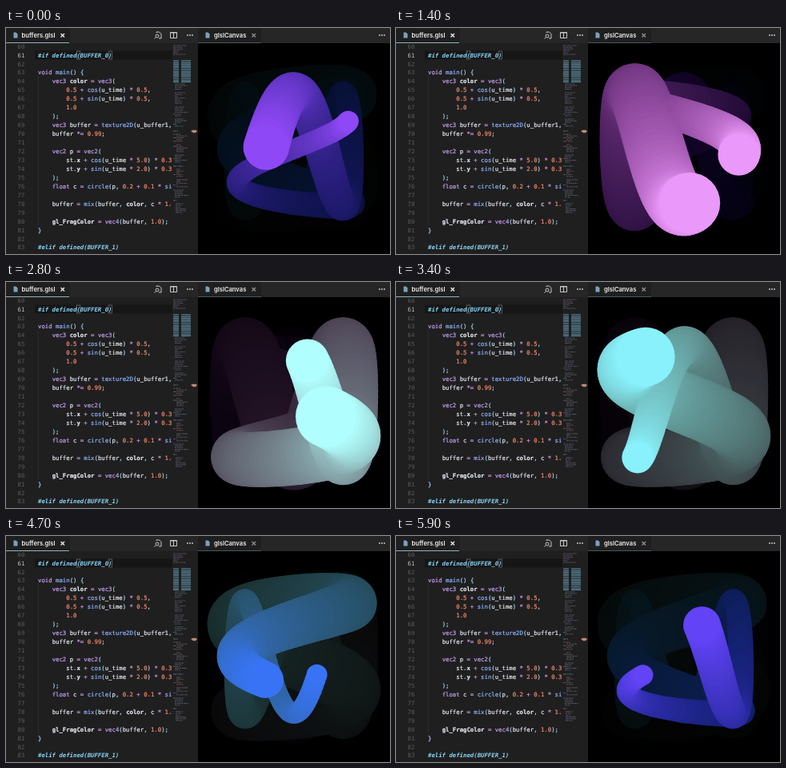
These frames come from a looping animation (480 px wide and 283 px high, 6000 ms). An HTML page with a canvas:

```html
<!DOCTYPE html>
<html lang="en">
<head>
<meta charset="utf-8">
<title>buffers.glsl</title>
<style>
  html, body { margin: 0; width: 100%; height: 100%; overflow: hidden; background: #000; }
  canvas, svg { position: absolute; left: 0; top: 0; width: 480px; height: 283px; display: block; }
  .code { font: 7.32px "DejaVu Sans Mono", monospace; white-space: pre; stroke-width: .2; }
  .bold { font-weight: bold; }
  .directive { font-weight: bold; font-style: italic; }
  .tab { font: 600 7.6px Inter, sans-serif; fill: #f0f0f0; }
  .icon { fill: none; stroke: #c8c8c8; stroke-width: 1; }
  .close { stroke: #f0f0f0; stroke-width: 1.3; }
</style>
</head>
<body>
<canvas id="view"></canvas>
<svg viewBox="0 0 480 283" xmlns="http://www.w3.org/2000/svg">
  <defs>
    <clipPath id="pane"><rect y="19" width="208" height="264"/></clipPath>
    <path id="page" d="M0 0h3l2 2v5h-5z" fill="#7aa3b8"/>
  </defs>
  <rect width="240" height="283" fill="#1f1f20"/>
  <rect x="80" width="160" height="19" fill="#262627"/>
  <rect x="240" width="240" height="19" fill="#262627"/>
  <rect x="240" width="79" height="19" fill="#1f1f20"/>
  <rect y="18" width="79" height="1" fill="#8fb3b8"/>
  <rect x="240" y="18" width="79" height="1" fill="#465a5e"/>
  <use href="#page" x="9.500" y="5.500"/>
  <use href="#page" x="249.500" y="5.500"/>
  <text class="tab" x="19.600" y="11.800">buffers.glsl</text>
  <text class="tab" x="260" y="11.800">glslCanvas</text>
  <path class="icon close" d="M68.500 7l4.500 4.500m0-4.500l-4.500 4.500"/>
  <path class="icon close" opacity=".55" d="M307.500 7l4.500 4.500m0-4.500l-4.500 4.500"/>
  <path class="icon" d="M188 6V5h3.500l2.500 2.500V13h-3M191 10a2 2 0 1 0-4 0a2 2 0 1 0 4 0M187.500 11.500l-2 2"/>
  <path class="icon" d="M205.500 5.500h8v7h-8zM209.500 5.500v7M205 6h9"/>
  <g id="dots" fill="#d0d0d0"></g>
  <g id="code" clip-path="url(#pane)">
    <rect x="36" y="28.500" width="172" height="11" fill="#161617"/>
    <path d="M40.500 59V248" stroke="#333335" stroke-width=".6"/>
  </g>
  <g id="map"></g>
  <path d="M231 129l2.500-1.200h3.500l2 1.200l-2 2.200h-3z" fill="#c08a74"/>
</svg>
<script>
const NS = 'http://www.w3.org/2000/svg';
const byId = id => document.getElementById(id);

function add(parent, tag, attrs, text) {
  const el = document.createElementNS(NS, tag);
  for (const k in attrs) el.setAttribute(k, attrs[k]);
  if (text !== undefined) el.textContent = text;
  parent.appendChild(el);
  return el;
}

// Editor text
const FIRST = 60, LINE = 10.95, CHAR = 4.407, LEFT = 40;
const lines = `
#if defined(BUFFER_0)

void main() {
    vec3 color = vec3(
        0.5 + cos(u_time) * 0.5,
        0.5 + sin(u_time) * 0.5,
        1.0
    );
    vec3 buffer = texture2D(u_buffer1, uv, 0.0).rgb;
    buffer *= 0.99;

    vec2 p = vec2(
        st.x + cos(u_time * 5.0) * 0.3,
        st.y + sin(u_time * 2.0) * 0.3
    );
    float c = circle(p, 0.2 + 0.1 * sin(u_time));

    buffer = mix(buffer, color, c * 1.0);

    gl_FragColor = vec4(buffer, 1.0);
}

#elif defined(BUFFER_1)`.split('\n');

const rules = [
  [/^(void|float|vec\d)$/, '#c5a0f0'],
  [/^(main|cos|sin|mix|circle|texture2D)$/, '#8fb4ff'],
  [/^\d/, '#f78c6c'],
  [/^[=+*]/, '#d49be8'],
  [/^[^\w\s]/, '#a5dcf5']
];
const tint = word => (rules.find(r => r[0].test(word)) || [0, '#e6e8f0'])[1];
const strong = /^(gl_FragColor|color|x|y)$/;

function drawCode() {
  const g = byId('code');
  lines.forEach((line, i) => {
    const y = 25.6 + i * LINE;
    add(g, 'text', { class: 'code', x: 14.5, y, fill: i === 1 ? '#c0c0c0' : '#5c5c5e' }, FIRST + i);
    const text = add(g, 'text', { class: 'code', x: LEFT, y });
    if (line[0] === '#') {
      add(text, 'tspan', { class: 'directive', fill: '#89d3f5' }, line);
      return;
    }
    for (const word of line.match(/\d+\.\d+|\w+|\s+|[^\w\s]/g) || []) {
      const fill = tint(word);
      add(text, 'tspan', { class: strong.test(word) ? 'bold' : '', fill, stroke: fill }, word);
    }
  });
  for (const col of [11, 20]) {
    add(g, 'rect', { x: LEFT + col * CHAR, y: 29, width: CHAR, height: 10,
      fill: 'none', stroke: '#85858a', 'stroke-width': .6 });
  }
}

// Minimap: from, to, indent, longest line, colour
const blocks = [
  [22, 35, 0, 18, '#8a7698'], [70, 78, 2, 16, '#778497'],
  [81, 96, 2, 14, '#7b7f93'], [99, 111, 2, 18, '#7c7797'],
  [114, 125, 2, 16, '#75899a'], [129, 130, 0, 13, '#70b3d0'],
  [133, 143, 4, 14, '#9a7b80'], [146, 156, 4, 15, '#8e8295'],
  [159, 169, 2, 17, '#7f86a0'], [173, 174, 0, 13, '#70b3d0'],
  [177, 187, 4, 14, '#9a7b80'], [190, 200, 4, 15, '#8e8295'],
  [203, 212, 2, 17, '#7f86a0'], [216, 217, 0, 13, '#70b3d0'],
  [220, 233, 3, 15, '#8a819b']
];

function drawMap() {
  let seed = 7;
  const rnd = () => (seed = seed * 16807 % 2147483647) / 2147483647;
  const g = byId('map');
  for (const [from, to, indent, longest, stroke] of blocks) {
    for (let y = from; y <= to; y += 2.2) {
      const x = 209 + indent * Math.round(rnd() * .8 + .3);
      const end = Math.min(231, x + longest * (.3 + rnd() * .7));
      add(g, 'path', { d: `M${x} ${y}H${end}`, stroke, 'stroke-width': .9,
        'stroke-dasharray': `${2 + rnd() * 4} .8 ${1 + rnd() * 3} .6`, opacity: .6 });
    }
  }
  for (let y = 41; y < 68; y += 2.2)
    add(g, 'path', { d: `M209 ${y}h7m3 0h12`, stroke: '#72a9c4', 'stroke-width': 1.1, opacity: .85 });
}

for (const x of [227, 230, 233, 467, 470, 473])
  add(byId('dots'), 'circle', { cx: x, cy: 9, r: .9 });
drawCode();
drawMap();

// Two discs leave fading trails
const LOOP = 6000, STEP = 100, FPS = 60, TRAIL = 300, FADE = .99 * .99;
const CX = 359.9, CY = 151.5, SWING = 70.8, SIZE = 127.5;
const { sin, cos, pow, PI } = Math;
const view = byId('view'), ctx = view.getContext('2d');
const scale = window.devicePixelRatio || 1;
view.width = 480 * scale;
view.height = 283 * scale;
ctx.scale(scale, scale);

const clock = [[0, -1.315], [900, -.49], [1400, .05], [LOOP, 4.65]];
function shaderTime(ms) {
  const i = clock.findIndex(p => ms < p[0]);
  const [m0, t0] = clock[i - 1], [m1, t1] = clock[i];
  return t0 + (t1 - t0) * (ms - m0) / (m1 - m0);
}

// Shader colour as a wide-gamut display shows it
const toLinear = v => v <= .04045 ? v / 12.92 : pow((v + .055) / 1.055, 2.4);
const toByte = v => Math.round(255 * Math.min(1, v <= .0031308 ? v * 12.92 : 1.055 * pow(v, 1 / 2.4) - .055));
function shade(t, fade) {
  const r = toLinear((.5 + cos(t) * .5) * fade);
  const g = toLinear((.5 + sin(t) * .5) * fade);
  const b = toLinear(fade);
  const mix = [.76 * r + .22 * g + .01 * b, .04 * r + .94 * g + .05 * b, .02 * r + .07 * g + .91 * b];
  return `rgb(${mix.map(toByte)})`;
}

function disc(x, y, r) {
  ctx.beginPath();
  ctx.arc(CX + SWING * x, CY + SWING * y, SIZE * r, 0, 2 * PI);
  ctx.fill();
}

function draw(ms) {
  const now = shaderTime(ms);
  ctx.fillStyle = '#000';
  ctx.fillRect(0, 0, 480, 283);
  for (let i = TRAIL; i >= 0; i--) {
    const t = now - i / FPS, s = sin(2 * t);
    ctx.fillStyle = shade(t, pow(FADE, i));
    disc(cos(5 * t), s, .2 + .1 * sin(t));
    disc(s, cos(6 * t), .2 + .1 * cos(t));
  }
}

const start = performance.now();
let shown = -1;
function tick() {
  const ms = Math.floor((performance.now() - start) % LOOP / STEP) * STEP;
  if (ms !== shown) draw(shown = ms);
  requestAnimationFrame(tick);
}
tick();
</script>
</body>
</html>
```
